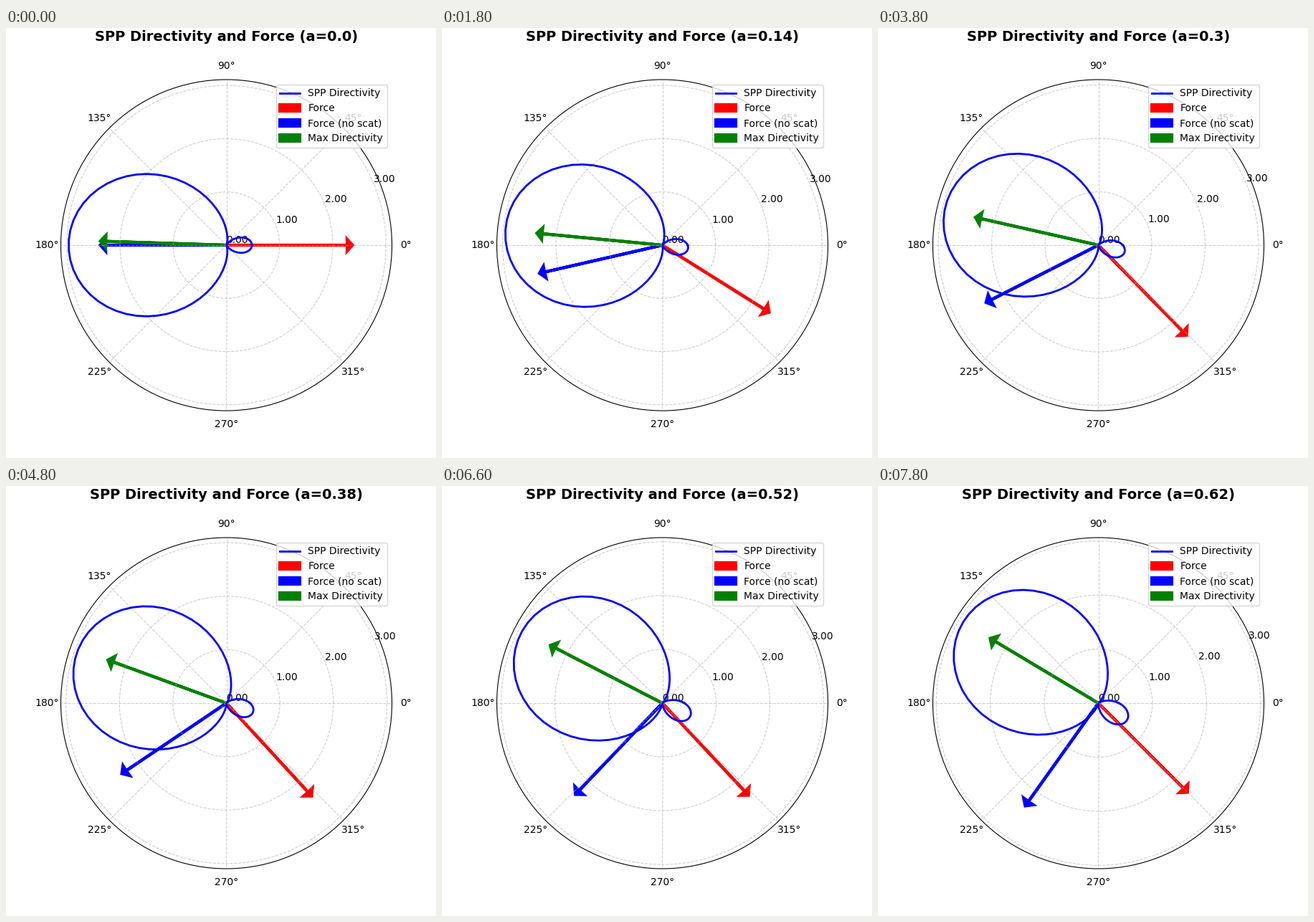
Write a matplotlib script that moves like this. It is 600 by 600 pixels and loops after 8 s.

```python
import numpy as np
import matplotlib.pyplot as plt
from matplotlib.animation import FuncAnimation

FRAMES, INTERVAL = 40, 200
STEP = np.pi / 198
THETA = np.linspace(0, 2 * np.pi, 100)

fig = plt.figure(figsize=(6, 6), dpi=100)
ax = fig.add_subplot(projection="polar")


def directivity(a):
    """Interference of p- and s-polarised parts, normalised to mean 1."""
    p2, s2, ps = np.cos(a) ** 2, np.sin(a) ** 2, np.sin(2 * a)
    x, y = np.cos(THETA), np.sin(THETA)
    wave = p2 * (0.2775 - 1.2424 * x + 1.445 * x**2)
    wave += s2 * 1.02 * y**2 + ps * (0.522 - 1.188 * x) * y
    return wave / (p2 + 0.51 * s2)


def force_angles(a):
    s, c = np.sin(2 * a), np.cos(2 * a)
    total = -np.arctan2(s, 1.2018 - 0.785 * c)
    unscattered = np.pi + np.arctan2(s, 0.383 + 0.885 * c)
    return total, unscattered


def arrow(angle, length, color, label):
    ax.arrow(angle, 0, 0, length, head_width=0.1, head_length=0.1, lw=3,
             length_includes_head=True, color=color, label=label)


def draw(i):
    a = i * STEP
    r = directivity(a)
    peak = r.max()
    best = THETA[np.argmax(np.round(r, 9))]
    total, unscattered = force_angles(a)

    ax.clear()
    ax.plot(THETA, r, color="blue", lw=2, label="SPP Directivity")
    arrow(total, 0.8 * peak, "red", "Force")
    arrow(unscattered, 0.8 * peak, "blue", "Force (no scat)")
    arrow(best, 0.8 * peak, "green", "Max Directivity")

    ticks = np.arange(4)
    ax.set_yticks(ticks, [f"{t:.2f}" for t in ticks])
    ax.set_ylim(0, 1.05 * peak)
    ax.grid(True, linestyle="--", alpha=0.6)
    ax.set_title(f"SPP Directivity and Force (a={round(a, 2)})",
                 fontsize=14, fontweight="bold", pad=20)
    ax.legend(loc="upper right")
    return []


anim = FuncAnimation(fig, draw, frames=FRAMES, interval=INTERVAL,
                     init_func=lambda: draw(0), repeat=True, repeat_delay=0)
plt.show()
```
